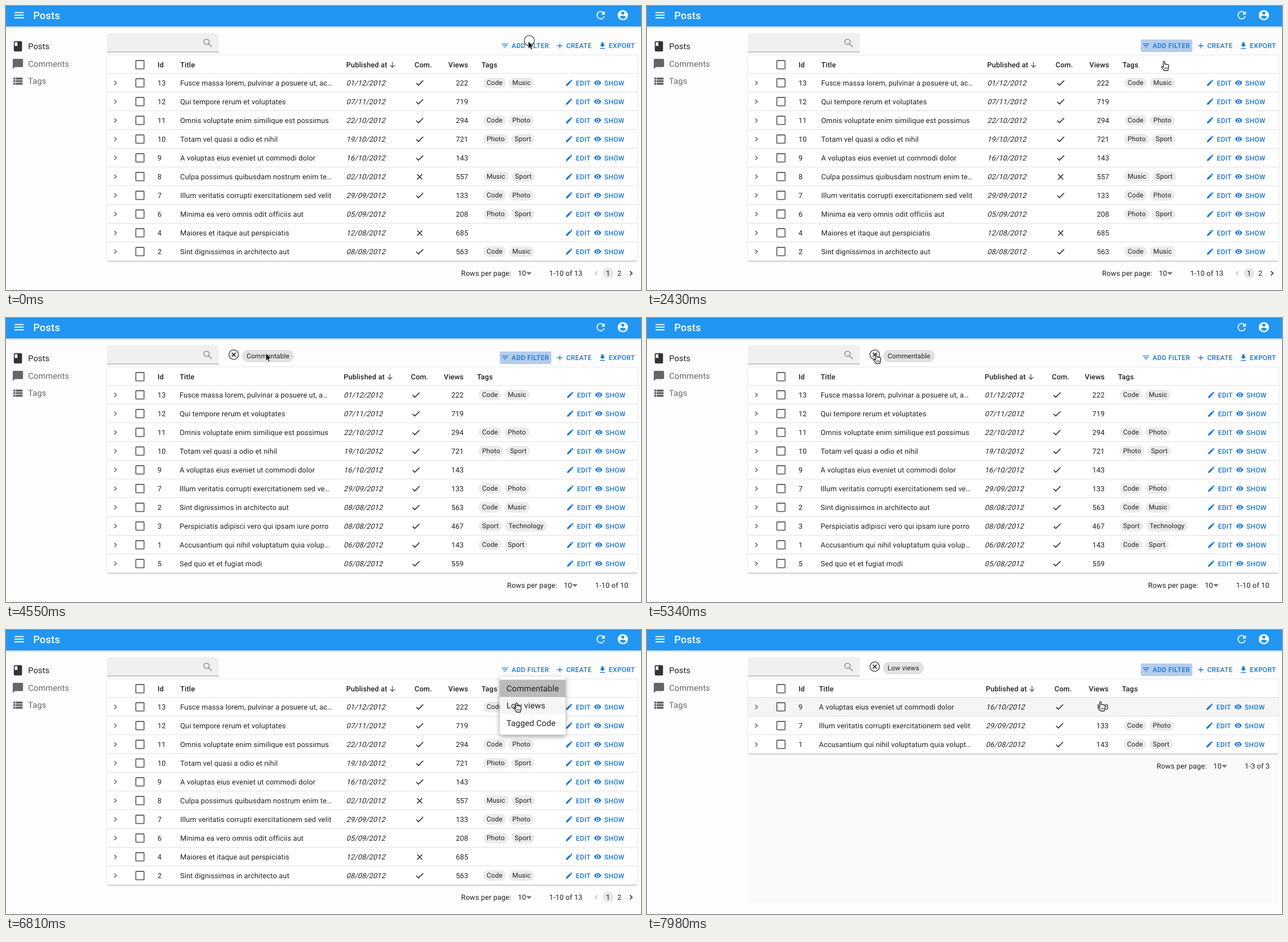
Animation, 1119 px wide and 500 px high, one loop 8000 ms. Source, as an HTML page:

```html
<!DOCTYPE html>
<html lang="en">
<head>
<meta charset="utf-8">
<title>Posts</title>
<style>
  html, body { margin: 0; width: 100%; height: 100%; overflow: hidden; background: #fdfdfd; }
  svg { display: block; width: 100vw; height: 100vh; }
  text { font: 12.7px Roboto, sans-serif; letter-spacing: .01071em; fill: #212121; white-space: pre; text-rendering: geometricPrecision; }
  .head { font-weight: 500; }
  .end { text-anchor: end; }
  .mid { text-anchor: middle; }
  .button { font-size: 11.85px; font-weight: 500; letter-spacing: .02857em; fill: #1976d2; }
  .chip { font-size: 11.8px; }
  .item { font-size: 14.5px; letter-spacing: .00938em; }
  .grey { fill: #666; }
  .title { font-size: 18.1px; font-weight: 500; letter-spacing: .0075em; fill: #fff; }
  .line { fill: none; stroke: #2a2a2a; stroke-width: 1.6; }
  .thin { fill: none; stroke: #5c5c5c; stroke-width: 1.4; }
  .box { fill: none; stroke: #666; stroke-width: 1.8; }
  #paper { filter: drop-shadow(0 1px 0 rgba(0, 0, 0, .16)) drop-shadow(0 .5px 1px rgba(0, 0, 0, .2)); }
  #bar { filter: drop-shadow(0 1.5px 2px rgba(0, 0, 0, .22)); }
  #panel { filter: drop-shadow(0 3px 4px rgba(0, 0, 0, .38)); }
</style>
</head>
<body>
<svg id="stage" viewBox="0 0 1119 500" preserveAspectRatio="none"></svg>
<script>
const LOOP = 8000, TOP = 119, ROW = 33, BLUE = '#1976d2';

const icons = {
  menu: 'M3 18h18v-2H3zm0-5h18v-2H3zm0-7v2h18V6z',
  refresh: 'M17.65 6.35A7.96 7.96 0 0 0 12 4a8 8 0 1 0 7.73 10h-2.08A6 6 0 1 1 12 6c1.66 0 3.14.69 4.22 1.78L13 11h7V4z',
  user: 'M12 2a10 10 0 1 0 0 20 10 10 0 0 0 0-20zm0 3a3 3 0 1 1 0 6 3 3 0 0 1 0-6zm0 14.2a7.2 7.2 0 0 1-6-3.22c.03-1.99 4-3.08 6-3.08s5.97 1.09 6 3.08a7.2 7.2 0 0 1-6 3.22z',
  book: 'M18 2H6a2 2 0 0 0-2 2v16a2 2 0 0 0 2 2h12a2 2 0 0 0 2-2V4a2 2 0 0 0-2-2zM6 4h5v8l-2.5-1.5L6 12z',
  bubble: 'M20 2H4a2 2 0 0 0-2 2v18l4-4h14a2 2 0 0 0 2-2V4a2 2 0 0 0-2-2z',
  list: 'M3 14h4v-4H3zm0 5h4v-4H3zM3 9h4V5H3zm5 5h13v-4H8zm0 5h13v-4H8zM8 5v4h13V5z',
  filter: 'M10 18h4v-2h-4zM3 6v2h18V6zm3 7h12v-2H6z',
  plus: 'M19 13h-6v6h-2v-6H5v-2h6V5h2v6h6z',
  download: 'M19 9h-4V3H9v6H5l7 7zM5 18v2h14v-2z',
  pencil: 'M3 17.25V21h3.75L17.81 9.94l-3.75-3.75zM20.71 7.04a1 1 0 0 0 0-1.41l-2.34-2.34a1 1 0 0 0-1.41 0l-1.83 1.83 3.75 3.75z',
  eye: 'M12 4.5C7 4.5 2.73 7.61 1 12c1.73 4.39 6 7.5 11 7.5s9.27-3.11 11-7.5c-1.73-4.39-6-7.5-11-7.5zM12 17a5 5 0 1 1 0-10 5 5 0 0 1 0 10zm0-8a3 3 0 1 0 0 6 3 3 0 0 0 0-6z'
};

// id: title, date, commentable, views, tags
const posts = {
  13: ['Fusce massa lorem, pulvinar a posuere ut, ac…', '01/12/2012', 'y', 222, 'Code Music'],
  12: ['Qui tempore rerum et voluptates', '07/11/2012', 'y', 719, ''],
  11: ['Omnis voluptate enim similique est possimus', '22/10/2012', 'y', 294, 'Code Photo'],
  10: ['Totam vel quasi a odio et nihil', '19/10/2012', 'y', 721, 'Photo Sport'],
  9: ['A voluptas eius eveniet ut commodi dolor', '16/10/2012', 'y', 143, ''],
  8: ['Culpa possimus quibusdam nostrum enim te…', '02/10/2012', 'n', 557, 'Music Sport'],
  7: ['Illum veritatis corrupti exercitationem sed velit', '29/09/2012', 'y', 133, 'Code Photo'],
  6: ['Minima ea vero omnis odit officiis aut', '05/09/2012', '', 208, 'Photo Sport'],
  5: ['Sed quo et et fugiat modi', '05/08/2012', 'y', 559, ''],
  4: ['Maiores et itaque aut perspiciatis', '12/08/2012', 'n', 685, ''],
  3: ['Perspiciatis adipisci vero qui ipsam iure porro', '08/08/2012', 'y', 467, 'Sport Technology'],
  2: ['Sint dignissimos in architecto aut', '08/08/2012', 'y', 563, 'Code Music'],
  1: ['Accusantium qui nihil voluptatum quia volupt…', '06/08/2012', 'y', 143, 'Code Sport']
};

const tables = [
  { ids: [13, 12, 11, 10, 9, 8, 7, 6, 4, 2], title: 307, date: 599.5, com: 729, views: 814.5, tags: 838, edit: 992,
    foot: 802, range: '1-10 of 13', pages: true, cut: {} },
  { ids: [13, 12, 11, 10, 9, 7, 2, 3, 1, 5], title: 306, date: 595, com: 722.5, views: 806.5, tags: 830, edit: 994,
    foot: 883, range: '1-10 of 10', filter: 'Commentable', cut: {
      13: 'Fusce massa lorem, pulvinar a posuere ut, a…',
      7: 'Illum veritatis corrupti exercitationem sed ve…',
      1: 'Accusantium qui nihil voluptatum quia volup…' } },
  { ids: [9, 7, 1], title: 303, date: 597, com: 727, views: 813.5, tags: 837, edit: 991,
    foot: 898, range: '1-3 of 3', filter: 'Low views', cut: {} }
];

const text = (x, y, s, cls = '') => `<text x="${x}" y="${y}" dy=".355em" class="${cls}">${s}</text>`;
const rect = (x, y, w, h, fill, more = '') => `<rect x="${x}" y="${y}" width="${w}" height="${h}" fill="${fill}" ${more}/>`;
const path = (d, cls) => `<path d="${d}" class="${cls}"/>`;
const icon = (name, x, y, size, fill, more = '') =>
  `<path d="${icons[name]}" fill="${fill}" fill-rule="evenodd" transform="translate(${x} ${y}) scale(${size}) translate(-12 -12)" ${more}/>`;

// Upright digits slanted around the baseline.
const slanted = (x, y, s) => `<g transform="translate(${x} ${y + 4.5}) skewX(-14)">${text(0, -4.5, s)}</g>`;

const pen = document.createElement('canvas').getContext('2d');
pen.font = '11.8px Roboto, sans-serif';
const widthOf = s => pen.measureText(s).width + s.length * .126;

const chip = (x, y, s, h, pad, fill) =>
  rect(x, y - h / 2, widthOf(s) + 2 * pad, h, fill, `rx="${h / 2}"`) + text(x + pad, y, s, 'chip');

function chips(x, y, tags) {
  let out = '';
  for (const tag of tags.split(' ').filter(Boolean)) {
    out += chip(x, y, tag, 18.5, 6, '#ebebeb');
    x += widthOf(tag) + 17.5;
  }
  return out;
}

const checkbox = y => `<rect x="228.7" y="${y - 7.3}" width="14.6" height="14.6" rx="1.2" class="box"/>`;

function row(t, id, i) {
  const y = 135.3 + i * ROW, [title, date, com, views, tags] = posts[id];
  const mark = { y: `M${t.com - 6} ${y + .5}l3.8 3.8 8.4-8.4`, n: `M${t.com - 4.5} ${y - 4}l9 9m0-9l-9 9` }[com];
  return path(`M190.8 ${y - 3.6}l3.8 3.6-3.8 3.6`, 'thin') + checkbox(y)
    + text(267, y, id) + text(t.title, y, t.cut[id] || title) + slanted(t.date, y, date)
    + (mark ? path(mark, 'line') : '') + text(t.views, y, views, 'end') + chips(t.tags + 3, y, tags)
    + icon('pencil', t.edit + .3, y, .6, BLUE) + text(t.edit + 12.2, y, 'EDIT', 'button')
    + icon('eye', t.edit + 50.6, y, .57, BLUE) + text(t.edit + 62.3, y, 'SHOW', 'button')
    + rect(178, TOP + (i + 1) * ROW - 1, 935, 1, '#e0e0e0');
}

function table(t, n) {
  const y = TOP + t.ids.length * ROW + 21.5, x = t.foot;
  let out = checkbox(103.3) + text(267, 103, 'Id', 'head') + text(t.title, 103, 'Title', 'head')
    + text(t.date, 103, 'Published at', 'head') + path(`M${t.date + 81.5} 98.5v9.5m-4-4l4 4 4-4`, 'thin')
    + text(t.com - 9, 103, 'Com.', 'head') + text(t.views, 103, 'Views', 'head end') + text(t.tags, 103, 'Tags', 'head')
    + rect(178, TOP - 1, 935, 1, '#e0e0e0') + t.ids.map((id, i) => row(t, id, i)).join('')
    + text(x, y, 'Rows per page:') + text(x + 100, y, '10')
    + `<path d="M${x + 114.5} ${y - 2}h10l-5 5z" fill="#757575"/>` + text(x + 155.3, y, t.range);
  if (t.pages) {
    out += `<circle cx="1061" cy="${y - .5}" r="9.5" fill="#e6e6e6"/>` + text(1061, y, '1', 'mid') + text(1081, y, '2', 'mid')
      + `<path d="M1042 ${y - 3.6}l-3.8 3.6 3.8 3.6" fill="none" stroke="#b5b5b5" stroke-width="1.4"/>`
      + path(`M1099.5 ${y - 3.6}l3.8 3.6-3.8 3.6`, 'line');
  }
  if (t.filter) {
    out += '<circle cx="401.3" cy="64.5" r="8.4" class="box"/>'
      + path('M397.9 61.1l6.8 6.8m0-6.8l-6.8 6.8', 'line') + chip(416, 67, t.filter, 22, 8, '#e2e2e2');
  }
  return `<g id="table${n}">${out}</g>`;
}

const stage = document.getElementById('stage');
stage.innerHTML =
  rect(0, 0, 1119, 36, '#2196f3', 'id="bar"') + icon('menu', 23, 16.2, .907, '#fff') + text(48, 16.1, 'Posts', 'title')
  + icon('refresh', 1048, 16.2, .907, '#fff', 'id="refresh"')
  + '<circle id="spinner" r="6.6" fill="none" stroke="#fff" stroke-width="1.8" stroke-dasharray="29 13"/>'
  + icon('user', 1087, 16.2, .907, '#fff')
  + icon('book', 21, 71, .907, '#333') + text(39, 70.8, 'Posts', 'item')
  + icon('bubble', 21, 102, .907, '#666') + text(39, 101.6, 'Comments', 'item grey')
  + icon('list', 21, 132.3, .907, '#666') + text(39, 132.2, 'Tags', 'item grey')
  + '<path d="M178 81V52q0-4 4-4h189q4 0 4 4v29z" fill="#f0f0f0"/>' + rect(178, 80.5, 197, 1, '#929292')
  + '<g fill="none" stroke="#9a9a9a" stroke-width="1.8"><circle cx="353.3" cy="63" r="4.7"/><path d="M356.8 66.5l5.6 5.6"/></g>'
  + rect(870, 59, 91, 22, '#b4cdec', 'rx="3" id="focus"')
  + icon('filter', 879.5, 70, .63, BLUE) + text(891, 70, 'ADD FILTER', 'button')
  + icon('plus', 976, 70, .65, BLUE) + text(987.2, 70, 'CREATE', 'button')
  + icon('download', 1051, 70, .65, BLUE) + text(1062.3, 70, 'EXPORT', 'button')
  + rect(178, 87, 935, 393, '#fafafa', 'id="area"')
  + rect(178, 87, 935, 362, '#fff', 'rx="3" id="paper"')
  + rect(178, TOP, 935, ROW - 1, '#f5f5f5', 'id="hover"')
  + tables.map(table).join('')
  + '<g id="menu">' + rect(870, 82, 116, 102.5, '#fff', 'rx="3.5" id="panel"')
  + rect(870, 87.5, 116, 30.5, '#bababa') + rect(870, 118, 116, 30.5, '#f5f5f5', 'id="low"')
  + ['Commentable', 'Low views', 'Tagged Code'].map((s, i) => text(882, 102.7 + i * 30.6, s, 'item')).join('') + '</g>'
  + '<circle id="ring" r="9" fill="none" stroke="#222" stroke-width="1.1"/>'
  + '<path id="arrow" d="M0 0v13.2l3-2.8 1.9 4.6 2.1-.9-1.9-4.5h4.1z" fill="#000" stroke="#fff" stroke-width=".8"/>'
  + '<g id="hand" fill="#fff" stroke="#111" stroke-width="1.1" stroke-linejoin="round"><g transform="translate(.6 .4) scale(1.08 1)">'
  + '<path d="M-3-7.5c0-1.6 2.4-1.6 2.4 0v4.3c.4-1 2-.9 2.2.2.5-.8 1.9-.5 2.1.4.6-.6 1.9-.3 1.9.9v4.2c0 2-.7 2.8-1.2 5.2h-6.2c-.6-2-2.6-3.6-3.9-5.4-.9-1.3.8-2.4 1.9-1.2l.8.9z"/>'
  + '<path d="M-.6 2v3.4M1.4 2v3.4M3.4 2v3.4" stroke-width=".8"/></g></g>';

const el = id => document.getElementById(id);
const show = (id, on) => el(id).setAttribute('visibility', on ? 'visible' : 'hidden');
const set = (id, name, value) => el(id).setAttribute(name, value);
const within = (t, spans) => spans.some(([a, b]) => t >= a && t < b);

// Progress in n even steps, the first at a and the last at b.
const steps = (t, a, b, n) => t < a ? 0 : Math.min(1, (Math.floor((t - a) / (b - a || 1) * (n - 1) + .03) + 1) / n);

// start, end, steps, x, y
const moves = [
  [90, 170, 2, 921, 66], [610, 820, 3, 917, 68], [1440, 1710, 4, 912.5, 105.5],
  [2970, 3770, 10, 700, 203], [3860, 3940, 2, 650, 236], [4120, 4550, 6, 458, 62],
  [4640, 4720, 2, 425, 50], [4810, 4900, 2, 404, 71], [4990, 4990, 1, 405, 72],
  [5440, 5910, 6, 908, 84], [6000, 6000, 1, 912.5, 73], [6450, 6810, 5, 901, 136.5],
  [7440, 7800, 5, 802, 135], [7980, 7980, 1, 800.5, 134.5]
];

function pointer(t) {
  let x = 920.5, y = 62;
  for (const [a, b, n, tx, ty] of moves) {
    const k = steps(t, a, b, n), e = k * k * (3 - 2 * k);
    x += (tx - x) * e;
    y += (ty - y) * e;
  }
  return [x, y];
}

function draw(t) {
  const [x, y] = pointer(t), at = `translate(${x} ${y})`;
  const active = t < 2700 ? 0 : t < 5530 ? 1 : t < 7500 ? 0 : 2;
  const bottom = TOP + tables[active].ids.length * ROW;
  tables.forEach((_, i) => show('table' + i, i === active));
  set('paper', 'height', bottom - 87);
  show('area', active === 2);

  const menu = steps(t, 1000, 1260, 4) - steps(t, 2160, 2400, 4) + steps(t, 6180, 6450, 4) - steps(t, 7080, 7330, 4);
  const grow = .75 + .25 * menu;
  set('menu', 'opacity', menu);
  set('menu', 'transform', `translate(870 82) scale(${grow} ${grow * grow}) translate(-870 -82)`);
  show('low', y > 118 && y < 149);
  show('focus', within(t, [[2340, 5170], [7250, LOOP]]));

  const line = Math.floor((y - TOP) / ROW);
  show('hover', menu < .01 && line >= 0 && y < bottom);
  set('hover', 'y', TOP + line * ROW);

  const busy = within(t, [[610, 820], [2520, 2790], [5350, 5620], [7330, 7590]]);
  show('refresh', !busy);
  show('spinner', busy);
  set('spinner', 'transform', `translate(1048 16.2) rotate(${t * .26})`);

  const arrow = t < 1530 || within(t, [[4460, 4810]]);
  show('arrow', arrow);
  show('hand', !arrow);
  show('ring', t < 440);
  set('arrow', 'transform', at);
  set('hand', 'transform', at);
  set('ring', 'transform', `translate(${x + 1.7} ${y - 1})`);
}

const begin = performance.now();
function tick() {
  draw((performance.now() - begin) % LOOP);
  requestAnimationFrame(tick);
}
tick();
</script>
</body>
</html>
```
